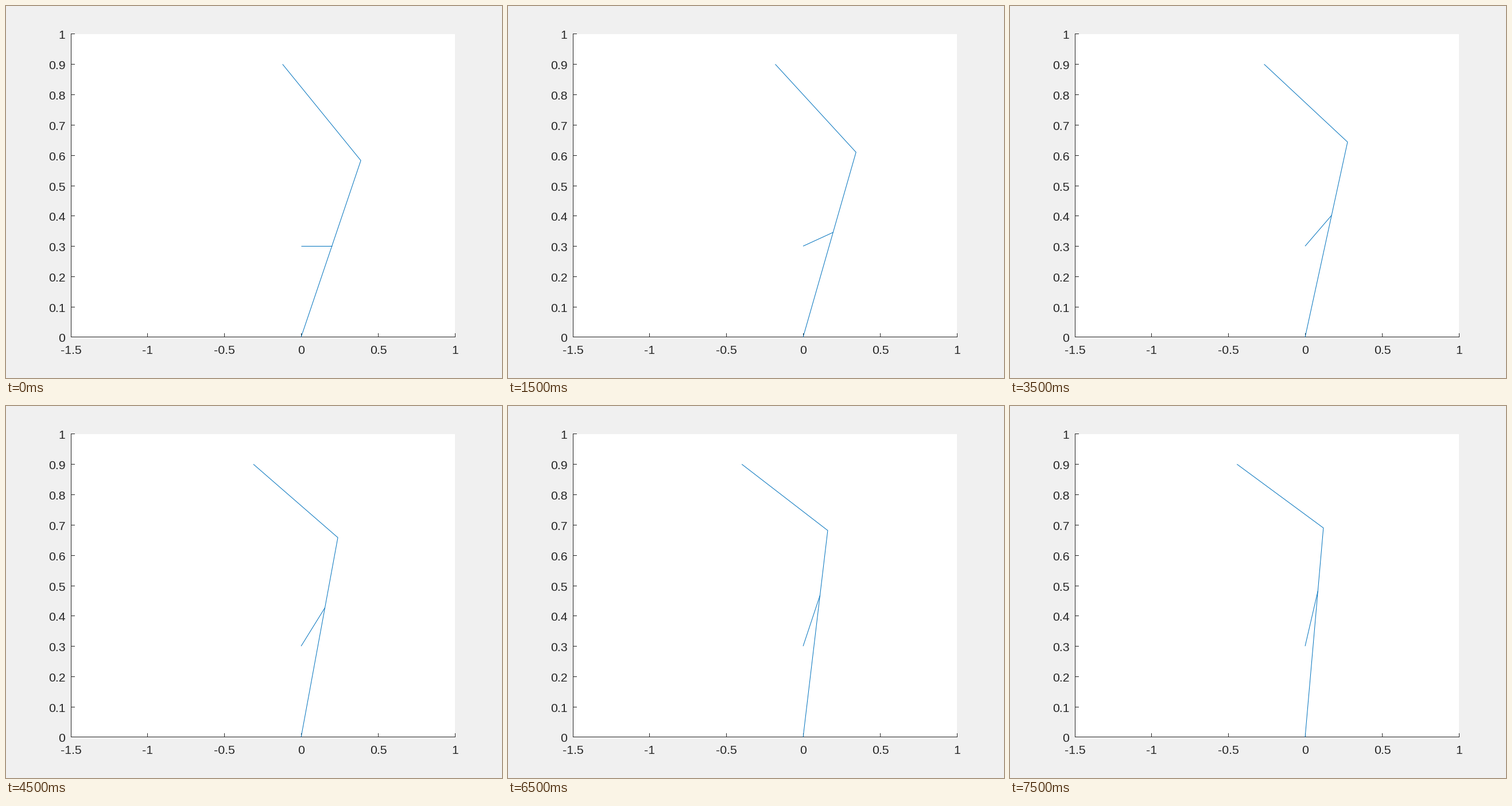
These frames come from a looping animation (864 by 648 pixels, 8 s). A matplotlib script:

```python
import numpy as np
import matplotlib.pyplot as plt
from matplotlib.animation import FuncAnimation
from matplotlib.patches import Rectangle

W, H, DPI = 864, 648, 100
PX = 72 / DPI                      # points per pixel
FRAMES, INTERVAL = 16, 500
STEP = np.radians(4.365)           # crank turn per frame
PIVOT, CRANK, LEVER, LINK, RAIL = 0.3, 0.2, 0.7, 0.6, 0.9
INK, BLUE = "#262626", "#0072BD"
LEFT, RIGHT, TOP, BOTTOM = 113, 782, 48, 576

plt.rcParams["font.family"] = "Liberation Sans"
fig = plt.figure(figsize=(W / DPI, H / DPI), dpi=DPI, facecolor="#F0F0F0")
ax = fig.add_axes([0, 0, 1, 1])
ax.set_xlim(0, W)
ax.set_ylim(H, 0)
ax.axis("off")


def to_px(x, y):
    return 514.08 + 267.84 * np.asarray(x), 576.72 - 528.12 * np.asarray(y)


def box(x, y, w, h, color):
    ax.add_patch(Rectangle((x, y), w, h, fc=color, ec="none", lw=0,
                           antialiased=False, zorder=1))


def label(x, y, value, align):
    ax.text(x, y, f"{value:g}", fontsize=21.3 * PX, color=INK,
            ha=align, va="baseline")


box(LEFT, TOP + 1, RIGHT - LEFT, BOTTOM - TOP, "white")
box(LEFT, BOTTOM, RIGHT - LEFT, 1, INK)
box(LEFT, TOP, 1, BOTTOM - TOP + 1, INK)

for v in np.arange(-1.5, 1.01, 0.5):
    x = max(round(float(to_px(v, 0)[0])), LEFT)
    box(x, BOTTOM - 6, 1, 7, INK)
    label(x + 0.5, 606, v, "center")

for v in np.arange(11) / 10:
    y = min(round(float(to_px(0, v)[1]) - 0.12), BOTTOM)
    y = max(y, TOP)
    box(LEFT, y, 7, 1, INK)
    label(103.5, y + 9, v, "right")

style = dict(color=BLUE, lw=PX, solid_capstyle="butt",
             solid_joinstyle="round", zorder=3)
arm, = ax.plot([], [], **style)
crank, = ax.plot([], [], **style)


def update(i):
    angle = i * STEP
    pin = np.array([CRANK * np.cos(angle), PIVOT + CRANK * np.sin(angle)])
    tip = LEVER * pin / np.hypot(*pin)
    slider = tip[0] - np.sqrt(LINK**2 - (RAIL - tip[1])**2)
    arm.set_data(*to_px([0, tip[0], slider], [0, tip[1], RAIL]))
    crank.set_data(*to_px([0, pin[0]], [PIVOT, pin[1]]))
    return arm, crank


anim = FuncAnimation(fig, update, frames=FRAMES, interval=INTERVAL,
                     repeat=True, repeat_delay=0, blit=False)
plt.show()
```
